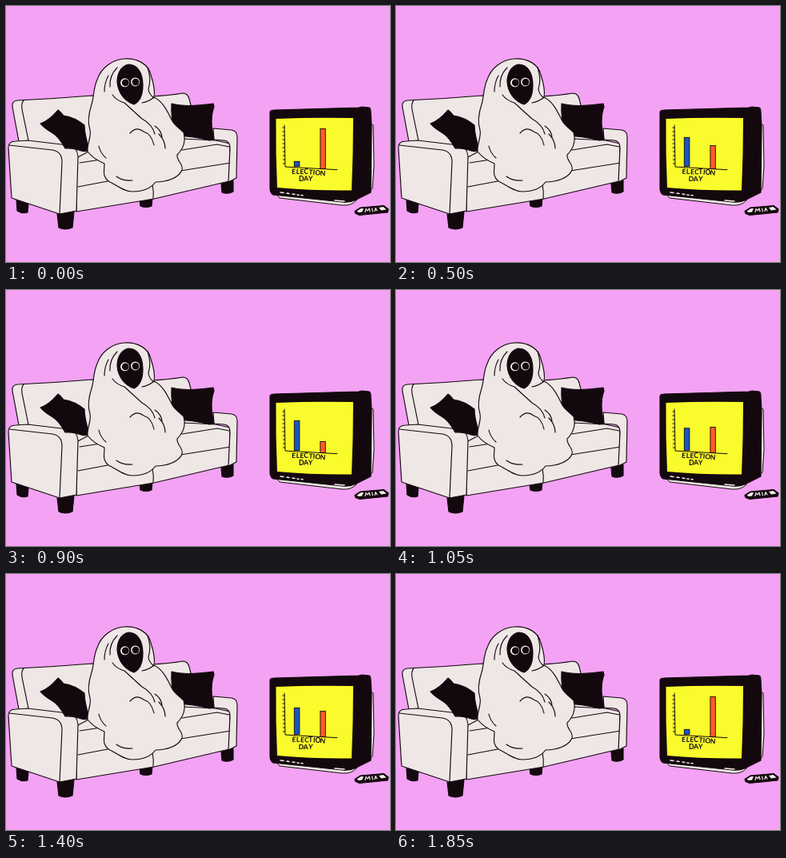
Animation, 480 px wide and 320 px high, one loop 1.9 s. Source, as an HTML page:

```html
<!DOCTYPE html>
<html lang="en">
<head>
<meta charset="utf-8">
<title>Election day</title>
<style>
  html, body { margin: 0; width: 100%; height: 100%; overflow: hidden; background: #f3a2f4; }
  svg { display: block; width: 100vw; height: 100vh; }
  .line { fill: none; stroke: #14080f; stroke-width: 1.15; stroke-linecap: round; stroke-linejoin: round; }
  .cloth { fill: #eee7e5; }
  .ink { fill: #14080f; }
  .pale { stroke: #f5eeec; }
  .thin { stroke-width: 1; }
  .bar { stroke-width: .9; stroke-linejoin: miter; }
  .blue { fill: #1657c4; animation: blue 1.9s infinite; }
  .red { fill: #ff5a28; animation: red 1.9s infinite; }
  .label { font: 700 8.6px Lato, "Open Sans", sans-serif; fill: #14080f; }
  .calm { animation: calm 1.9s step-end infinite; }
  .tilt { animation: tilt 1.9s step-end infinite; }

  /* Each leg advances once every 50 ms. */
  @keyframes blue {
    0%     { y: 194.3px; height: 6px;  animation-timing-function: steps(4); }
    10.52% { y: 177.3px; height: 23px; animation-timing-function: steps(6); }
    26.31% { y: 164.3px; height: 36px; animation-timing-function: steps(8); }
    47.36% { y: 163.3px; height: 37px; animation-timing-function: steps(6); }
    63.15% { y: 182.3px; height: 18px; animation-timing-function: steps(8); }
    84.21% { y: 152.3px; height: 48px; animation-timing-function: steps(5); }
    97.36%, 100% { y: 194.3px; height: 6px; }
  }
  @keyframes red {
    0%     { y: 153.4px; height: 50px; animation-timing-function: steps(4); }
    10.52% { y: 181.4px; height: 22px; animation-timing-function: steps(6); }
    26.31% { y: 174.4px; height: 29px; animation-timing-function: steps(8); }
    47.36% { y: 189.4px; height: 14px; animation-timing-function: steps(6); }
    63.15% { y: 153.4px; height: 50px; animation-timing-function: steps(8); }
    84.21% { y: 189.4px; height: 14px; animation-timing-function: steps(5); }
    97.36%, 100% { y: 153.4px; height: 50px; }
  }
  @keyframes calm {
    0%, 36.84%, 89.47% { visibility: visible; }
    18.42%, 57.89% { visibility: hidden; }
  }
  @keyframes tilt {
    0%, 36.84%, 89.47% { visibility: hidden; }
    18.42%, 57.89% { visibility: visible; }
  }
</style>
</head>
<body>
<svg viewBox="0 0 480 320" preserveAspectRatio="none">
  <rect width="480" height="320" fill="#f3a2f4"/>

  <g id="sofa" class="line">
    <g class="ink">
      <path d="M13 242L28 247L27 258Q20 260 14 256Z"/>
      <path d="M64 260L85 257L83 277Q74 281 66 277Z"/>
      <path d="M167 242L183 239L182 250Q175 253 168 250Z"/>
      <path d="M269 222L284 218L284 232Q277 236 270 233Z"/>
    </g>
    <path class="cloth" d="M16 169L8 126Q7 119 14 118Q60 116 107 112L181 113Q203 112 221 109Q227 109 229 116L233 132L262 170L250 205L90 225Z"/>
    <path d="M22 118Q19 121 20 129L28 168"/>
    <path class="cloth" d="M88 190L105 181L222 166L262 168L280 172L279 219L185 241L88 257Z"/>
    <path d="M92 196L125 191M90 226L127 219M183 223Q185 232 184 241M220 180L264 173L279 176M218 206L281 196"/>
    <path class="cloth" d="M259 153L282 155Q289 156 289 164L288 215L278 220L280 178Q280 169 273 168L260 167Z"/>
    <path class="cloth" d="M3 177Q3 169 12 169L27 168L78 174Q89 176 90 188L88 256L67 260L7 240Z"/>
    <path d="M4 174L58 180Q70 182 70 195L67 260M83 175L104 180"/>
  </g>

  <g id="pillows" class="line ink">
    <path d="M43 147Q54 143 65 130Q68 132 72 137Q86 139 98 149Q98 160 104 179Q101 183 94 181Q83 177 74 178Q66 163 57 158Q48 153 43 147Z"/>
    <path d="M207 122Q224 127 259 122L260 126Q254 142 260 167L254 168Q236 163 211 162Q206 140 207 122Z"/>
  </g>

  <g id="watcher" class="line">
    <path class="cloth" d="M148 66C133 67 119 77 114 92C109 103 110 114 107 123C103 135 102 146 105 155C107 164 101 172 102 182Q109 191 123 197C123 207 120 212 128 219C139 224 147 232 158 232C171 232 181 228 187 220C201 220 216 215 220 205C222 197 213 194 214 186C221 179 225 169 222 158C216 152 210 149 207 142C202 132 196 119 185 114C187 104 183 92 181 86C178 72 163 65 148 66Z"/>
    <path d="M139 77Q129 87 130 101M128 87Q123 96 123 107M177 77Q182 91 178 104Q179 111 185 115M170 121Q178 120 185 114M133 111Q138 118 148 121Q160 132 170 141Q183 148 186 160M155 159Q163 150 172 157Q182 160 185 174M186 150Q194 155 195 164M116 175Q118 184 125 190M191 160Q199 168 199 178M138 213Q146 219 158 218"/>
    <path class="ink" d="M153 73C144 75 139 84 139 95C140 108 148 119 160 123C168 119 171 109 171 99C171 83 164 73 153 73Z"/>
    <g stroke="none">
      <circle cx="148.6" cy="95.8" r="5.5" fill="#fff7ed"/>
      <circle cx="161.6" cy="94.9" r="5.5" fill="#fff7ed"/>
      <circle cx="149.3" cy="95.9" r="4.4" class="ink"/>
      <circle cx="162" cy="95.1" r="4.4" class="ink"/>
    </g>
  </g>

  <g id="television" class="line">
    <path class="cloth thin" d="M455 147L459 149L460 200L458 228L455 231Z"/>
    <path class="cloth thin" d="M337 234L342 240L420 249Q432 250 438 243Z"/>
    <path class="ink" d="M330 133Q330 130 335 130L441 127L445 126L454 127Q456 128 456 133L457 151L456 233L436 243Q429 246 420 245L334 236Q331 235 330 229Z"/>
    <path d="M337.5 141Q384 139 434 140Q434 185 432 230.5Q384 231 339 227Q337 183 337.5 141Z" fill="#f9fb2c" stroke="none"/>
    <path class="pale" d="M343 233L347 233.4M351 234L354 234.4M358 235L361 235.4M364 236L366 236.3M369 236.5L371 236.8M411 243L423 244" stroke-width="1.5"/>
  </g>

  <g id="chart" class="line">
    <path class="thin" d="M348 149L349 201L414 204.7"/>
    <path d="M348 152H346M348 157H346M348 162H346M348 167H346M348 172H346M348 177H346M348.5 182H346.5M348.5 187H346.5M348.5 192H346.5M348.5 197H346.5"/>
    <rect class="bar blue" x="360.3" y="194" width="6.6" height="6"/>
    <rect class="bar red" x="392.9" y="153" width="6.4" height="50"/>
  </g>

  <g id="caption" class="label">
    <g class="calm">
      <text x="357 362.4 367.3 372.3 378.2 383.5 386.2 392.5" y="209.8 209.8 210 210.2 210.4 210.8 211.2 211.8" rotate="2 4 3 0 5 4 2 6">ELECTION</text>
      <text x="366 372.2 377.7" y="219 218.8 218.4" rotate="0 -4 2">DAY</text>
    </g>
    <g class="tilt">
      <text x="357.3 362.8 367.8 373 378.3 383.8 386.6 392.3" y="209.6 209.8 210 210.2 210.3 210.5 210.7 211" rotate="5 2 5 2 0 6 0 8">ELECTION</text>
      <text x="365.5 371.7 377.8" y="218.8 219.3 218.6" rotate="4 -2 5">DAY</text>
    </g>
  </g>

  <g id="remote" class="line">
    <path class="ink" d="M436 256.5L443 252L472 249.5L478 254L477 258L442 261.5L437 259.5Z"/>
    <path d="M438.5 256.5L443.5 253.3L447 253L445 257.5L441 258Z M466 252L471.5 251L475.5 254.5L469 255.5Z" fill="#f5eeec" stroke="none"/>
    <path class="pale" d="M449 257.5L450 253.5L452 256L454 253L455 257M457.5 253L458.5 256.8M461 256.5L462 252.5L464 256"/>
  </g>
</svg>
</body>
</html>
```
